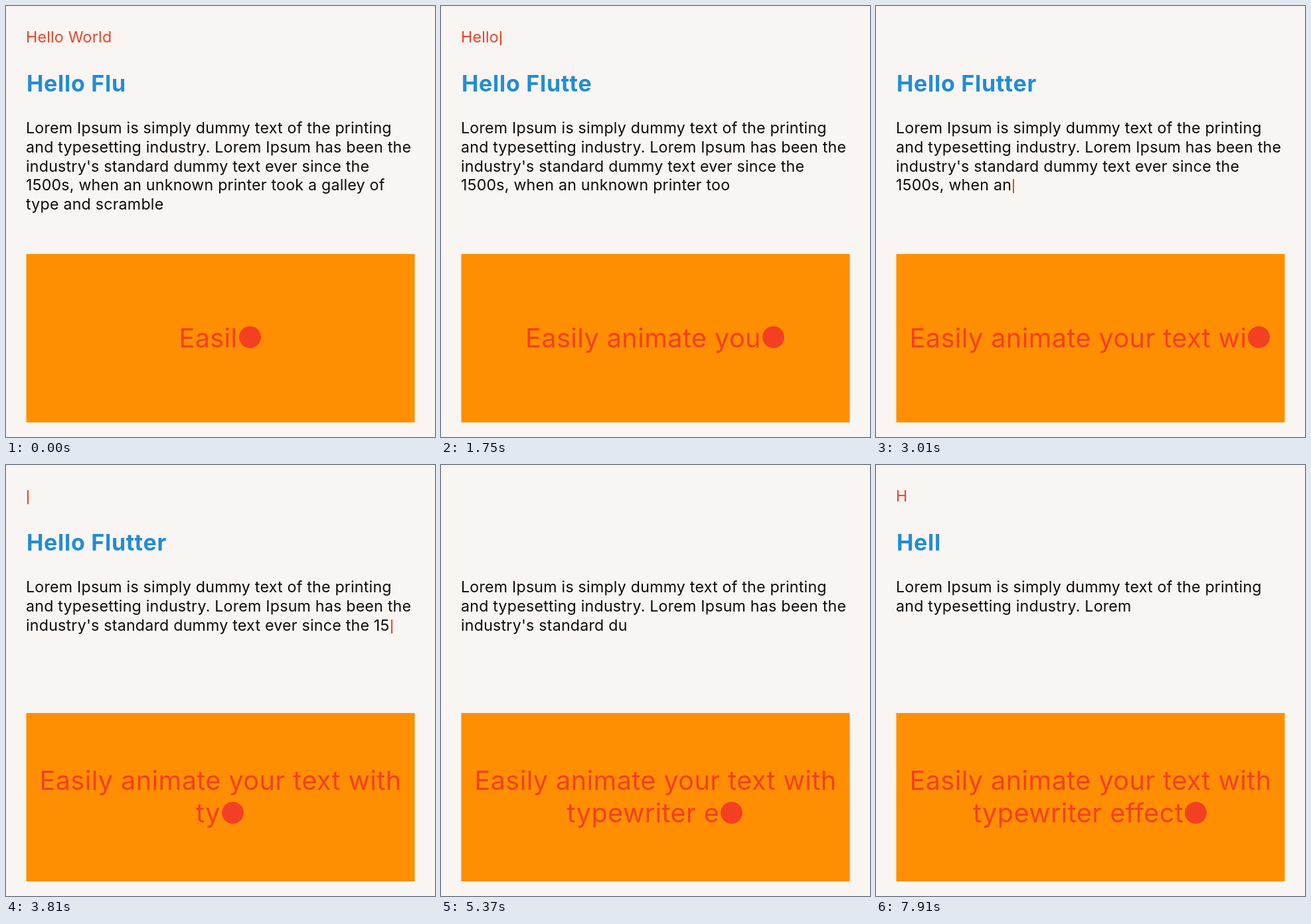
Animation, 646 px wide and 650 px high, one loop 8 s. Source, as an HTML page:

```html
<!DOCTYPE html>
<html lang="en">
<head>
<meta charset="utf-8">
<title>Typewriter</title>
<style>
  html, body {
    margin: 0;
    width: 100%;
    height: 100%;
    overflow: hidden;
    background: #f9f5f3;
  }
  body {
    position: relative;
    font-family: Inter, Roboto, sans-serif;
    font-optical-sizing: none;
    font-size: 23.2px;
    line-height: 28.8px;
    letter-spacing: 0.22px;
  }
  .line {
    position: absolute;
    left: 30px;
    width: 588px;
    white-space: pre-wrap;
  }
  #greet { top: 33px; color: #f44022; }
  #title {
    left: 31px;
    top: 95.6px;
    color: #218dd3;
    font-size: 34px;
    font-weight: 700;
    line-height: 41px;
    letter-spacing: 0.72px;
  }
  #para { top: 170px; color: #0d0b08; }
  #panel {
    position: absolute;
    left: 30px;
    top: 374px;
    width: 584px;
    height: 254px;
    border: solid #ff8f0080;
    border-width: 0 1px;
    background: #ff8f00 padding-box;
    display: flex;
    align-items: center;
    justify-content: center;
  }
  #banner {
    width: 556px;
    flex: none;
    color: #f44022;
    font-size: 39.7px;
    line-height: 49px;
    letter-spacing: 0.38px;
    text-align: center;
    white-space: pre-wrap;
  }
  .tail { white-space: nowrap; }
  .bar, .dot { display: inline-block; }
  .bar {
    width: 2px;
    height: 21px;
    margin-left: 2px;
    vertical-align: -4px;
    background: #f44022;
  }
  .dot {
    width: 33px;
    height: 33px;
    margin: 0 2px;
    vertical-align: -1.5px;
    border-radius: 50%;
    background: #f44022;
  }
</style>
</head>
<body>
<div id="greet" class="line"></div>
<div id="title" class="line"></div>
<div id="para" class="line"></div>
<div id="panel"><div id="banner"></div></div>
<script>
const LOOP = 8000;
const GREET = "Hello World";
const TITLE = "Hello Flutter";
const PARA = "Lorem Ipsum is simply dummy text of the printing and typesetting industry. " +
  "Lorem Ipsum has been the industry's standard dummy text ever since the 1500s, " +
  "when an unknown printer took a galley of type and scramble";
const BANNER = "Easily animate your text with typewriter effect";
const BLINK = 1400;

// [time, characters erased from the paragraph]
const ERASED = [[-90, 0], [1103, 19.4], [1803, 31.1], [3063, 51.5],
  [4650, 76.5], [6050, 100.5], [7963, 131.6]];

const clamp = (v, lo, hi) => Math.max(lo, Math.min(hi, v));

// Steps completed by time c when the first falls at start.
const steps = (c, start, gap) => Math.max(0, Math.floor((c - start) / gap) + 1);

function along(points, x) {
  let i = 1;
  while (i < points.length - 1 && x > points[i][0]) i++;
  const [x0, y0] = points[i - 1], [x1, y1] = points[i];
  return y0 + (y1 - y0) * (x - x0) / (x1 - x0);
}

// A text line whose last word stays together with its cursor.
function typer(id, cursorClass) {
  const box = document.getElementById(id);
  const head = document.createTextNode("");
  const word = document.createTextNode("");
  const tail = document.createElement("span");
  tail.className = "tail";
  tail.append(word);
  let cursor = null;
  if (cursorClass) {
    cursor = document.createElement("span");
    cursor.className = cursorClass;
    tail.append(cursor);
  }
  box.append(head, tail);
  return (text, lit = true) => {
    const cut = text.lastIndexOf(" ") + 1;
    head.data = text.slice(0, cut);
    word.data = text.slice(cut);
    if (cursor) cursor.style.visibility = lit ? "visible" : "hidden";
  };
}

const showGreet = typer("greet", "bar");
const showTitle = typer("title");
const showPara = typer("para", "bar");
const showBanner = typer("banner", "dot");

// Playback advances in bursts of three pictures: 20, 20 and 100 ms.
function clock(t) {
  if (t < 170) return -90 + t * 260 / 170;
  const p = (t - 30) % 140;
  return t - p + Math.min(2, Math.floor(p / 20)) * 140 / 3;
}

const lit = (c, start) => c >= start && Math.floor((c - start) / BLINK) % 2 === 0;

function greetLength(c) {
  return c < 5000 ? Math.max(0, GREET.length - steps(c, 45, 300)) : steps(c, 7400, 600);
}

function titleLength(c) {
  return c < 5200 ? Math.min(TITLE.length, 9 + steps(c, 300, 600)) : steps(c, 5800, 600);
}

function draw(t) {
  const c = clock(t);
  const erased = Math.max(0, Math.floor(along(ERASED, c)));
  const typed = clamp(Math.floor((c + 970) / 149), 0, BANNER.length);
  showGreet(GREET.slice(0, greetLength(c)), lit(c, 700));
  showTitle(TITLE.slice(0, titleLength(c)));
  showPara(PARA.slice(0, PARA.length - erased), lit(c, 120));
  showBanner(BANNER.slice(0, typed));
}

const began = performance.now();
function tick() {
  draw((performance.now() - began) % LOOP);
  requestAnimationFrame(tick);
}
draw(0);
requestAnimationFrame(tick);
</script>
</body>
</html>
```
